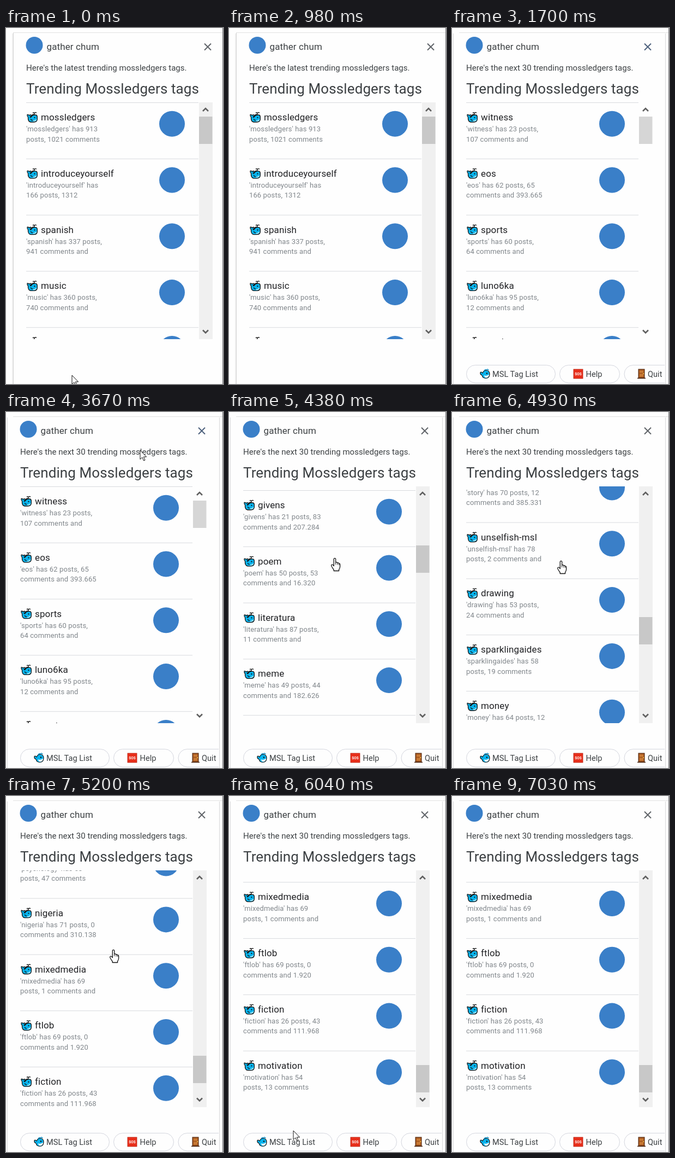
These frames come from a looping animation (398 by 651 pixels, 8 s). An HTML page:

```html
<!DOCTYPE html>
<html lang="en">
<head>
<meta charset="utf-8">
<title>Trending tags</title>
<style>
html, body { margin: 0; width: 100%; height: 100%; overflow: hidden; background: #fefefe; }
svg { display: block; width: 398px; height: 651px; font-family: Roboto, "Open Sans", sans-serif; fill: #3c4043; }
text { white-space: pre; }
.name { font-size: 17px; letter-spacing: .12px; fill: #202124; }
.sub { font-size: 13px; letter-spacing: .12px; fill: #80868b; }
.head { font-size: 17px; letter-spacing: .12px; }
.body { font-size: 15px; letter-spacing: .04px; }
.big { font-size: 26px; letter-spacing: .1px; }
.chip { font-size: 14.6px; }
.line { fill: none; stroke: #d8dade; }
.logo { fill: #3a7fc8; }
.mark { fill: none; stroke: #5f6368; stroke-width: 2; }
.arrow { fill: none; stroke: #606060; stroke-width: 2.6; }
</style>
</head>
<body>
<svg id="stage" viewBox="0 0 398 651" xmlns="http://www.w3.org/2000/svg"></svg>
<script>
const LOOP = 8000, PITCH = 102.8;

// name | rest of first line | second line
const firstTags = `mossledgers|913|posts, 1021 comments
introduceyourself||166 posts, 1312
spanish|337 posts,|941 comments and
music|360 posts,|740 comments and
art|310 posts,|688 comments and`;

const nextTags = `witness|23 posts,|107 comments and
eos|62 posts, 65|comments and 393.665
sports|60 posts,|64 comments and
luno6ka|95 posts,|12 comments and
travel|48 posts, 71|comments and 251.402
nature|57 posts, 39|comments and 198.750
givens|21 posts, 83|comments and 207.284
poem|50 posts, 53|comments and 16.320
literatura|87 posts,|11 comments and
meme|49 posts, 44|comments and 182.626
garden|32 posts, 28|comments and 94.117
cooking|41 posts,|36 comments and
health|66 posts, 18|comments and 140.528
history|38 posts, 25|comments and 77.309
film|29 posts, 31|comments and 63.845
science|44 posts,|20 comments and
story|70 posts, 12|comments and 385.331
unselfish-msl|78|posts, 2 comments and
drawing|53 posts,|24 comments and
sparklingaides|58|posts, 19 comments
money|64 posts, 12|comments and 120.416
family|35 posts, 22|comments and 88.063
games|51 posts, 16|comments and 54.290
writing|47 posts,|30 comments and
psychology|58|posts, 47 comments
nigeria|71 posts, 0|comments and 310.138
mixedmedia|69|posts, 1 comments and
ftlob|69 posts, 0|comments and 1.920
fiction|26 posts, 43|comments and 111.968
motivation|54|posts, 13 comments`;

// time, content offset, thumb offset
const scrolls = [
  [0, 0, 0], [4090, 150, 20], [4230, 380, 50], [4380, 609.8, 82],
  [4520, 870, 114], [4660, 1130, 146], [4800, 1410, 180], [4930, 1682, 213],
  [5060, 2110, 264], [5200, 2519.3, 313], [5350, 2651.5, 330]
];

// time, tip x, tip y, pointer kind
const moves = [
  [0, 121, 635, "arrow"], [140, 119, 632, "arrow"], [280, 117, 629, "arrow"],
  [420, 120, 632, "arrow"], [560, 124, 636, "arrow"], [700, 127, 641, "arrow"],
  [840, 127, 646, "arrow"], [980, 0, 0, ""],
  [2260, 3, 438, "arrow"], [2400, 2, 322, "arrow"], [2550, 0, 0, ""],
  [2830, 2, 316, "arrow"], [2970, 22, 288, "arrow"], [3110, 60, 248, "arrow"],
  [3250, 104, 203, "arrow"], [3390, 152, 157, "arrow"], [3530, 206, 108, "arrow"],
  [3670, 246, 70, "arrow"], [3810, 243, 65, "arrow"],
  [3950, 222, 160, "hand"], [4090, 203, 235, "hand"], [4230, 195, 262, "hand"],
  [4380, 194, 267, "hand"], [4660, 197, 269, "hand"], [4930, 200, 272, "hand"],
  [5060, 199, 276, "hand"], [5200, 197, 281, "hand"], [5350, 195, 300, "hand"],
  [5490, 188, 340, "hand"], [5630, 176, 398, "hand"], [5770, 159, 468, "hand"],
  [5910, 138, 545, "hand"], [6040, 118, 612, "arrow"], [6200, 102, 630, "hand"],
  [6480, 106, 600, "arrow"], [6620, 112, 571, "arrow"], [6760, 109, 598, "arrow"],
  [6890, 101, 629, "hand"], [7030, 0, 0, ""]
];

const text = (x, y, kind, value) => `<text x="${x}" y="${y}" class="${kind}">${value}</text>`;
const rect = (x, y, w, h, more) => `<rect x="${x}" y="${y}" width="${w}" height="${h}" ${more}/>`;
const disc = (x, y, r) => `<circle cx="${x}" cy="${y}" r="${r}" class="logo"/>`;
const path = (d, more) => `<path d="${d}" ${more}/>`;

const row = (entry, i) => {
  const [name, first, second] = entry.split("|");
  return `<g transform="translate(0 ${(136.5 + i * PITCH).toFixed(1)})">
    ${path("M0 0H316", 'class="line"')}
    <use href="#whale" x="1" y="16.5"/>
    ${text(27, 32.5, "name", name)}
    ${text(0, 52.6, "sub", `'${name}' has ${first}`)}
    ${text(0, 71, "sub", second)}
    ${disc(267.5, 38.7, 23.5)}</g>`;
};

const panel = (id, left, intro, tags, extra) => `<g id="${id}" transform="translate(${left} 0)">
  ${disc(15, 31.5, 15.5)}
  ${text(37.5, 40, "head", "gather chum")}
  ${path("M327 28.5l12 12m0-12l-12 12", 'class="mark"')}
  ${text(0, 78, "body", intro)}
  ${text(0, 120, "big", "Trending Mossledgers tags")}
  <g clip-path="url(#view)"><g class="rows">${tags.split("\n").map(row).join("")}</g></g>
  ${rect(317, 136, 25, 433, 'class="track" fill="#f0f0f0"')}
  ${rect(317, 162, 24.5, 50, 'class="thumb" fill="#c8c8c8"')}
  ${path("M324 152l5-5 5 5M324 552.5l5 5 5-5", 'class="arrow"')}
  ${extra}</g>`;

const chip = (id, x, w, label, labelX) =>
  rect(x, 616.5, w, 32.5, `id="${id}" rx="16.25" fill="#fefefe" stroke="#d4d6de"`) +
  text(labelX, 638, "chip", label);

const chips = `<g clip-path="url(#tray)">
  ${chip("list", .5, 163, "MSL Tag List", 48)}
  <use href="#spout" x="25" y="623"/>
  ${chip("help", 171.5, 110, "Help", 219.5)}
  ${rect(197, 624, 17, 17, 'fill="#e8301c" stroke="#b92514" stroke-width=".8"')}
  <text x="205.5" y="635" font-size="6.5" font-weight="700" text-anchor="middle" fill="#fff">SOS</text>
  ${chip("quit", 290, 120, "Quit", 333)}
  ${rect(316, 624, 11, 16, 'fill="#a4561f" stroke="#4a2410"')}
  ${path("M318 626.5h7v4h-7zm0 6h7v5h-7z", 'fill="#c87a35"')}
  ${path("M314 640.5h15", 'stroke="#4a2410" stroke-width="1.5"')}
  <circle cx="325.2" cy="632" r="1" fill="#ffd34d"/></g>`;

const stage = document.getElementById("stage");
stage.innerHTML = `<defs>
  <clipPath id="view"><rect x="-2" y="136" width="320" height="433"/></clipPath>
  <clipPath id="tray"><rect x="-2" y="610" width="366" height="41"/></clipPath>
  <g id="whale" stroke-linejoin="round">
    ${path("M9 7.5Q9 6 11 5.5L14 5V2.5Q12.5 .8 11 2.5M14 3Q15.5 .5 18 2.2", 'fill="none" stroke="#111" stroke-width="1.3"')}
    ${path("M1 5.5Q3.5 5 4.5 7Q6 5 8 6Q8.5 8.5 6 10H8Q10 6 14 6H17Q19.3 6.5 19.3 10V14Q19 19 13 19H7Q2 18 2.5 10Q.5 8.5 1 5.5Z", 'fill="#08b4ee" stroke="#111" stroke-width="1.3"')}
    ${path("M10 16.7Q15 17 18.3 13.2Q18 18 13 18Z", 'fill="#b8ecfb"')}
    ${path("M7.5 13Q8 16.5 11.5 15.5", 'fill="none" stroke="#111" stroke-width="1.2"')}
    <circle cx="14.5" cy="10.8" r="1.1" fill="#111"/>
  </g>
  <g id="spout" stroke-linejoin="round">
    ${path("M1 7Q3 5 5 8Q7 3 12 3Q18 3.5 18 10Q17.5 17.5 11 17.5Q5 17.5 4 12Q.5 11 1 7Z", 'fill="#08b4ee" stroke="#111" stroke-width="1.2"')}
    ${path("M8 12Q12 14.5 17 10.5Q17 16.5 11 16.5Q8.5 16 8 12Z", 'fill="#fff"')}
    ${path("M8 4Q9 1 12 2Q15 0 16 3", 'fill="none" stroke="#0a8ac0" stroke-width="1.4"')}
    <circle cx="13" cy="8.5" r="1.2" fill="#111"/>
  </g></defs>
  ${rect(0, 0, 398, 651, 'fill="#fefefe"')}
  ${path("M13 8.5H397", 'stroke="#e2e2e2"')}
  ${path("M397.5 0V651", 'stroke="#77777b"')}
  <g id="edgeA">${path("M13.5 9V651", 'stroke="#d2d2d2"')}${path("M12 10V651", 'stroke="#f0f0f0" stroke-width="2"')}</g>
  <g id="edgeB">${path("M2.5 10V651M391.5 10V651", 'stroke="#d8d8da"')}</g>
  ${panel("first", 37, "Here's the latest trending mossledgers tags.", firstTags, "")}
  ${panel("next", 26, "Here's the next 30 trending mossledgers tags.", nextTags, chips)}
  <g id="pointer" fill="#fff" stroke="#111" stroke-linejoin="round">
    ${path("M0 0V16.5L3.9 12.9 6.6 19 9 18 6.4 12H11.6Z", 'id="arrow"')}
    <g id="hand">
      ${path("M-1.7 13V2Q-1.6 .4 0 .4T1.7 2V8Q3.5 7 5 8.8Q6.8 8 7.7 9.8Q9.6 9.6 9.6 12V16Q9.4 19 7.6 21V23.5H-1.8V21.5Q-4 18.5-5.8 15.2Q-7 12.8-5.2 12Q-3.8 11.6-1.7 14.5Z", 'stroke-width="1.3"')}
      ${path("M1.7 8V12M5 9V12.5M7.8 10V13", 'fill="none"')}
    </g>
  </g>`;

const find = key => stage.querySelector(key);
const show = (key, on) => find(key).setAttribute("display", on ? "inline" : "none");
const at = (steps, t) => steps.findLast(step => step[0] <= t);

function draw(t) {
  const second = t >= 1700, active = t >= 3950;
  show("#first", !second);
  show("#edgeA", !second);
  show("#next", second);
  show("#edgeB", second);

  const [, offset, thumb] = at(scrolls, t);
  find("#next .rows").setAttribute("transform", `translate(0 ${-offset})`);
  find("#next .thumb").setAttribute("y", 162 + thumb);
  find("#next .track").setAttribute("fill", active ? "#f0f0f0" : "#fefefe");
  find("#next .thumb").setAttribute("fill", active ? "#c8c8c8" : "#d6d6d6");
  find("#next .mark").style.stroke = active ? "#5f6368" : "#4c607c";

  const [, x, y, kind] = at(moves, t);
  find("#pointer").setAttribute("transform", `translate(${x} ${y})`);
  show("#arrow", kind === "arrow");
  show("#hand", kind === "hand");
  find("#list").setAttribute("fill", kind === "hand" && y > 616 ? "#f5f6f8" : "#fefefe");
}

const start = performance.now();
function tick() {
  draw((performance.now() - start) % LOOP);
  requestAnimationFrame(tick);
}
tick();
</script>
</body>
</html>
```
